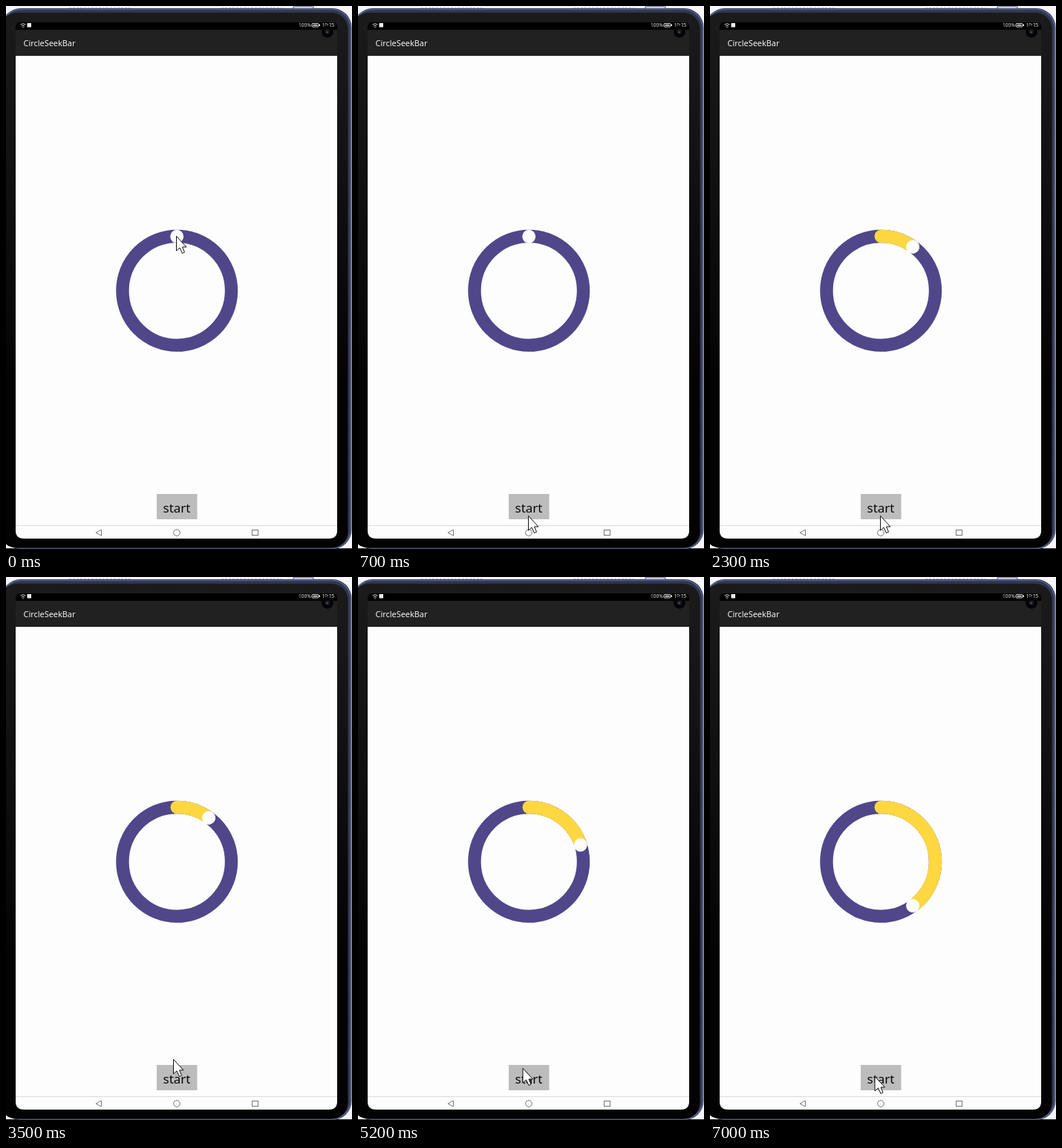
An HTML page for the animation above (8 s loop, 466 by 730 pixels).

```html
<!DOCTYPE html>
<html lang="en">
<head>
<meta charset="utf-8">
<title>Circle seek bar</title>
<style>
html, body { margin: 0; width: 100%; height: 100%; overflow: hidden; background: #f3f5fa; }
svg { display: block; }
text { font-family: "Noto Sans", "Open Sans", sans-serif; }
</style>
</head>
<body>
<svg width="466" height="730" viewBox="0 0 466 730">
  <defs>
    <linearGradient id="case" x2="0" y2="1">
      <stop stop-color="#1b1b1c"/>
      <stop offset=".3" stop-color="#111"/>
      <stop offset=".7" stop-color="#030303"/>
    </linearGradient>
  </defs>

  <!-- tablet body -->
  <path d="M85 2.5H168M290 2.5H372" stroke="#b9bdc9" stroke-dasharray="3 2"/>
  <path d="M387 3V1H414V3" fill="none" stroke="#3d4a86"/>
  <path d="M0 729.5H466" stroke="#111"/>
  <rect x="-6" y="3" width="471.5" height="727" rx="26" fill="#30364f"/>
  <rect x="-5" y="4.5" width="469" height="724.5" rx="25" fill="none" stroke="#59618a" stroke-width="1.5"/>
  <rect x="-8" y="9" width="468.5" height="719.5" rx="22" fill="url(#case)"/>

  <!-- screen -->
  <path d="M13 32V28Q13 22 19 22H440Q446 22 446 28V32Z" fill="#000"/>
  <path d="M13 32H446V67H13Z" fill="#212121"/>
  <path d="M13 67H446V705Q446 716 435 716H24Q13 716 13 705Z" fill="#fdfdfd"/>
  <path d="M13 698.5H446" stroke="#dcdcdc"/>
  <text x="23.5" y="54" font-size="10.9" fill="#f2f2f2">CircleSeekBar</text>

  <!-- status bar -->
  <g fill="none" stroke="#ddd">
    <path d="M19.5 25Q23 22.5 26.5 25M21 27Q23 25.5 25 27"/>
    <path d="M23 28V29.5"/>
    <rect x="412" y="23.5" width="9" height="4.5" rx="1"/>
  </g>
  <path d="M28.5 23H34V28.5H28.5ZM413.5 25H419.5V26.5H413.5ZM421.5 24.5H423V27H421.5Z" fill="#eee"/>
  <g font-size="6.6" fill="#e4e4e4">
    <text x="394" y="28.3">100%</text>
    <text x="425.5" y="28.3">10:25</text>
  </g>
  <circle cx="433" cy="34.5" r="8" fill="#050506"/>
  <circle cx="433" cy="34.5" r="3.3" fill="#191b25"/>
  <circle cx="432.4" cy="35.2" r="1.1" fill="#555b70"/>

  <!-- navigation bar -->
  <g fill="none" stroke="#777">
    <path d="M121 708L128.5 704V712Z"/>
    <circle cx="230" cy="708" r="4.3"/>
    <rect x="331.5" y="704.5" width="8" height="7"/>
  </g>

  <rect x="203" y="656" width="54.5" height="34" fill="#bcbcbc"/>
  <text x="230" y="680.5" font-size="17" text-anchor="middle" fill="#080808">start</text>

  <!-- seek bar -->
  <g transform="translate(230.2 382.8)">
    <g fill="none" stroke-width="17.4">
      <circle r="73.3" stroke="#4f4789"/>
      <path id="arc" stroke="#ffd740" stroke-linecap="round"/>
    </g>
    <circle id="thumb" cy="-73" r="9" fill="#fdfdfd"/>
  </g>

  <path id="cursor" d="M0 .5V20L4.5 16L8 23.5L11 22L8 15H13.5Z" fill="#fff" stroke="#111"/>
</svg>
<script>
const LOOP = 8000, STEP = 100, R = 73.3;
const el = id => document.getElementById(id);
const ticks = [1700, 3900, 5600, 7000];   // each adds a tenth of the circle
const path = [                            // time, x, y of the pointer
  [0, 229.5, 309], [100, 229.5, 320], [600, 229.5, 685],
  [3400, 229.5, 685], [3500, 225.5, 648], [3800, 222, 660],
  [5200, 222, 660], [5500, 222, 671], [LOOP, 222, 671]
];

function pointer(t) {
  const i = path.findIndex(p => p[0] > t);
  const [t0, x0, y0] = path[i - 1], [t1, x1, y1] = path[i];
  const k = (t - t0) / (t1 - t0);
  return [x0 + (x1 - x0) * k, y0 + (y1 - y0) * k];
}

function draw(now) {
  const t = Math.floor(now % LOOP / STEP) * STEP;
  const turns = ticks.filter(s => t >= s).length / 10;
  const a = turns * 2 * Math.PI;
  el("arc").setAttribute("d", turns
    ? `M0 ${-R}A${R} ${R} 0 0 1 ${R * Math.sin(a)} ${-R * Math.cos(a)}` : "");
  el("thumb").setAttribute("transform", `rotate(${turns * 360})`);
  el("cursor").setAttribute("transform", `translate(${pointer(t)})`);
}

const start = performance.now();
function frame() {
  draw(performance.now() - start);
  requestAnimationFrame(frame);
}
frame();
</script>
</body>
</html>
```
